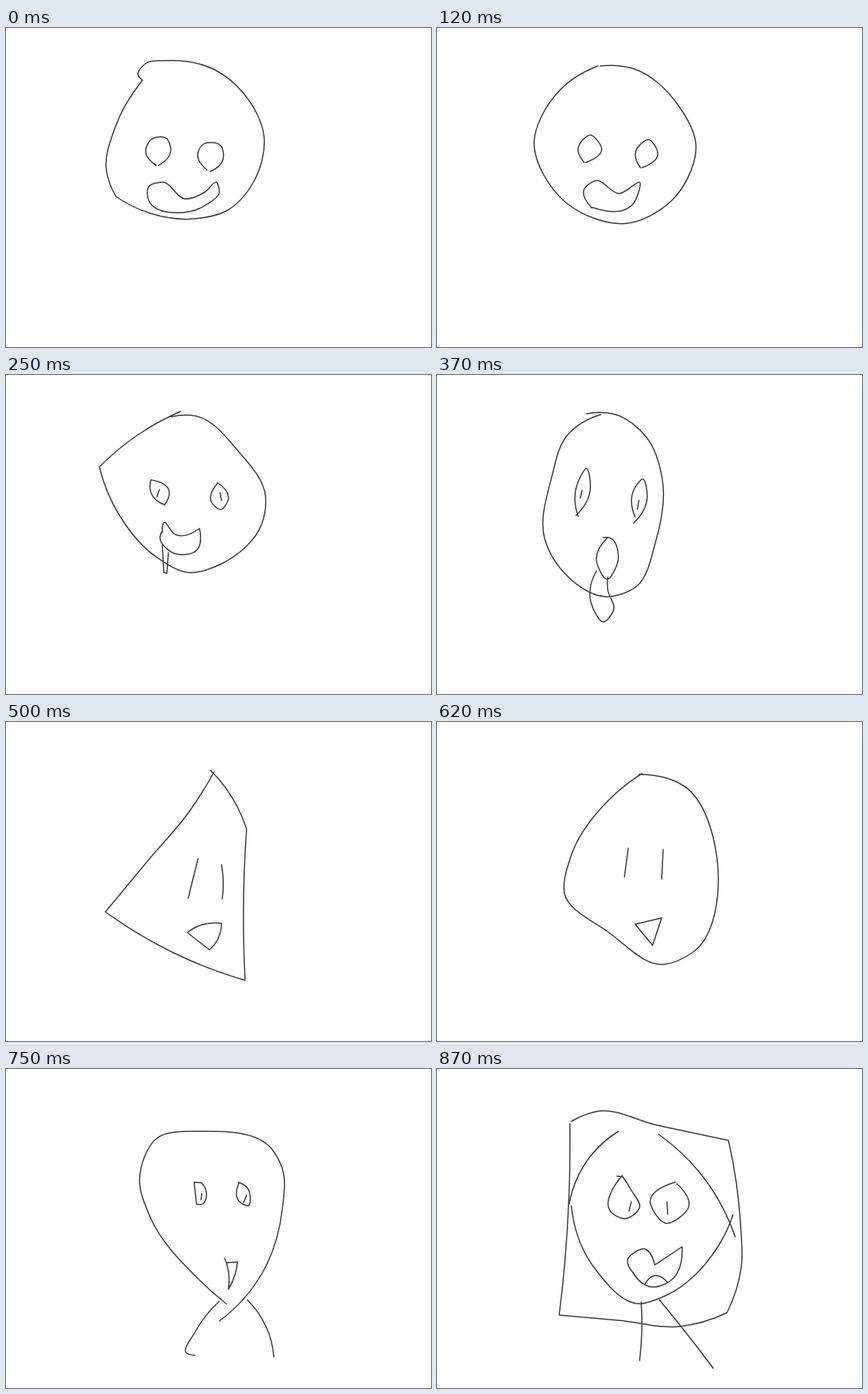
Animation of 560 by 420 pixels, one loop 1 s. Source, as an HTML page:

```html
<!DOCTYPE html>
<html lang="en">
<head>
<meta charset="utf-8">
<title>Doodle heads</title>
<style>
  html, body { margin: 0; width: 100%; height: 100%; overflow: hidden; background: #fff; }
  svg { display: block; width: 560px; height: 420px; }
  path { fill: none; stroke: #383838; stroke-width: 1.5; stroke-linecap: round; stroke-linejoin: round; }
</style>
</head>
<body>
<svg viewBox="0 0 560 420"><path id="ink"/></svg>
<script>
// Each drawing is a list of strokes; points are joined smoothly, "|" marks a sharp corner.
const round = [
  '180,69 174,62 185,46 210,43 275,55 313,86 340,143 326,203 290,241 250,251 190,244 145,222 | 132,185 143,133 179,70',
  '198,181 184,162 191,147 211,145 217,162 201,181',
  '265,187 253,164 260,153 283,155 286,173 269,189',
  '211,242 188,227 188,209 206,203 236,225 262,216 277,203 281,217 265,232 205,241'
];

const lopsided = [
  '215,50 260,54 318,102 341,152 315,221 252,257 170,230 128,150 158,86 212,50',
  '194,177 186,158 202,141 217,160 196,177',
  '268,184 262,162 279,147 291,166 270,184',
  '204,237 194,212 209,201 240,218 267,203 258,232 204,236'
];

const pointed = [
  '230,48 175,78 123,121 | 149,184 200,241 240,260 285,248 337,196 342,160 305,99 250,54 218,55',
  '191,138 191,155 209,171 | 215,153 191,138',
  '202,151 199,160',
  '279,142 271,168 283,177 293,163 279,142',
  '282,155 284,165',
  '206,207 208,194 223,210 255,202 | 251,231 222,235 203,213 206,205',
  '206,224 208,260 | 212,261 | 214,234'
];

const tall = [
  '197,51 235,52 276,82 297,138 288,220 262,279 225,292 162,254 142,216 151,135 172,79 216,52',
  '186,186 184,146 197,123 202,150 183,185',
  '191,152 189,162',
  '261,187 260,150 271,137 277,159 259,195',
  '266,165 264,177',
  '225,214 210,243 224,269 239,240 229,215 219,214',
  '210,258 203,300 220,325 233,308 225,283 225,266'
];

const wedge = [
  '269,64 275,69',
  '274,66 240,120 190,179 131,250 | 221,304 315,340 | 313,280 317,141 | 305,112 270,64',
  '253,180 240,232',
  '284,188 286,205 285,233',
  '239,277 258,267 284,265 | 279,286 268,300 | 240,278'
];

const pick = [
  '270,68 225,104 176,178 168,226 225,276 300,319 336,304 369,180 325,84 266,69',
  '252,166 247,204',
  '298,168 296,207',
  '262,266 296,258 | 284,294 | 261,266'
];

const balloon = [
  '290,309 255,278 190,195 176,145 199,91 255,82 350,105 364,131 364,185 338,268 281,332',
  '281,306 250,345 238,374 249,377',
  '318,304 343,340 353,379',
  '248,150 | 251,178 | 260,177 264,168 258,150 | 248,149',
  '258,164 257,172',
  '307,150 307,174 319,180 319,158 306,149',
  '317,166 313,176',
  '288,249 291,257 293,290 | 302,270 305,254 | 291,255'
];

const boxed = [
  '177,69 210,56 290,74 384,94 | 400,205 401,260 382,321 | 320,339 240,331 161,324 | 174,165 175,72',
  '239,82 202,115 174,178',
  '177,180 206,260 267,309 300,299 372,231 390,192',
  '292,86 345,135 393,221',
  '237,141 245,142 | 255,158 267,182 248,197 231,190 244,140',
  '256,175 253,187',
  '314,149 281,173 301,203 332,180 316,151',
  '303,175 304,191',
  '260,270 251,252 274,237 287,258 | 323,234 | 306,280 283,287 258,268',
  '274,283 287,272 304,281',
  '269,307 270,340 267,384',
  '293,304 320,337 364,394'
];

// Smooth cubic segments whose tangents allow for uneven spacing.
function curve(pts) {
  const n = pts.length - 1;
  const len = [], dir = [], tan = [];
  for (let i = 0; i < n; i++) {
    const [x, y] = pts[i], [u, v] = pts[i + 1];
    len[i] = Math.hypot(u - x, v - y);
    dir[i] = [(u - x) / len[i], (v - y) / len[i]];
  }
  for (let i = 1; i < n; i++) {
    const w = len[i] / (len[i - 1] + len[i]);
    tan[i] = dir[i].map((c, k) => dir[i - 1][k] * w + c * (1 - w));
  }
  const end = (d, t) => t ? d.map((c, k) => 2 * c - t[k]) : d;
  const inner = tan[n - 1];
  tan[0] = end(dir[0], tan[1]);
  tan[n] = end(dir[n - 1], inner);

  let d = '';
  for (let i = 0; i < n; i++) {
    const p = pts[i].map((c, k) => c + tan[i][k] * len[i] / 3);
    const q = pts[i + 1].map((c, k) => c - tan[i + 1][k] * len[i] / 3);
    d += `C${p} ${q} ${pts[i + 1]}`;
  }
  return d;
}

function stroke(text) {
  let last = null, d = '';
  for (const part of text.split('|')) {
    const pts = part.trim().split(' ').map(p => p.split(',').map(Number));
    if (last) pts.unshift(last);
    else d = 'M' + pts[0];
    if (pts.length > 1) d += curve(pts);
    last = pts[pts.length - 1];
  }
  return d;
}

const LOOP = 1000;
const scenes = [
  [0, round], [120, lopsided], [250, pointed], [370, tall],
  [500, wedge], [620, pick], [750, balloon], [870, boxed]
].map(([at, strokes]) => ({ at, d: strokes.map(stroke).join('') }));

const ink = document.getElementById('ink');
let shown = null;

function draw(ms) {
  const t = ms % LOOP;
  const scene = scenes.filter(s => s.at <= t).pop();
  if (scene !== shown) ink.setAttribute('d', scene.d);
  shown = scene;
}

const start = performance.now();
function tick() {
  draw(performance.now() - start);
  requestAnimationFrame(tick);
}
tick();
</script>
</body>
</html>
```
